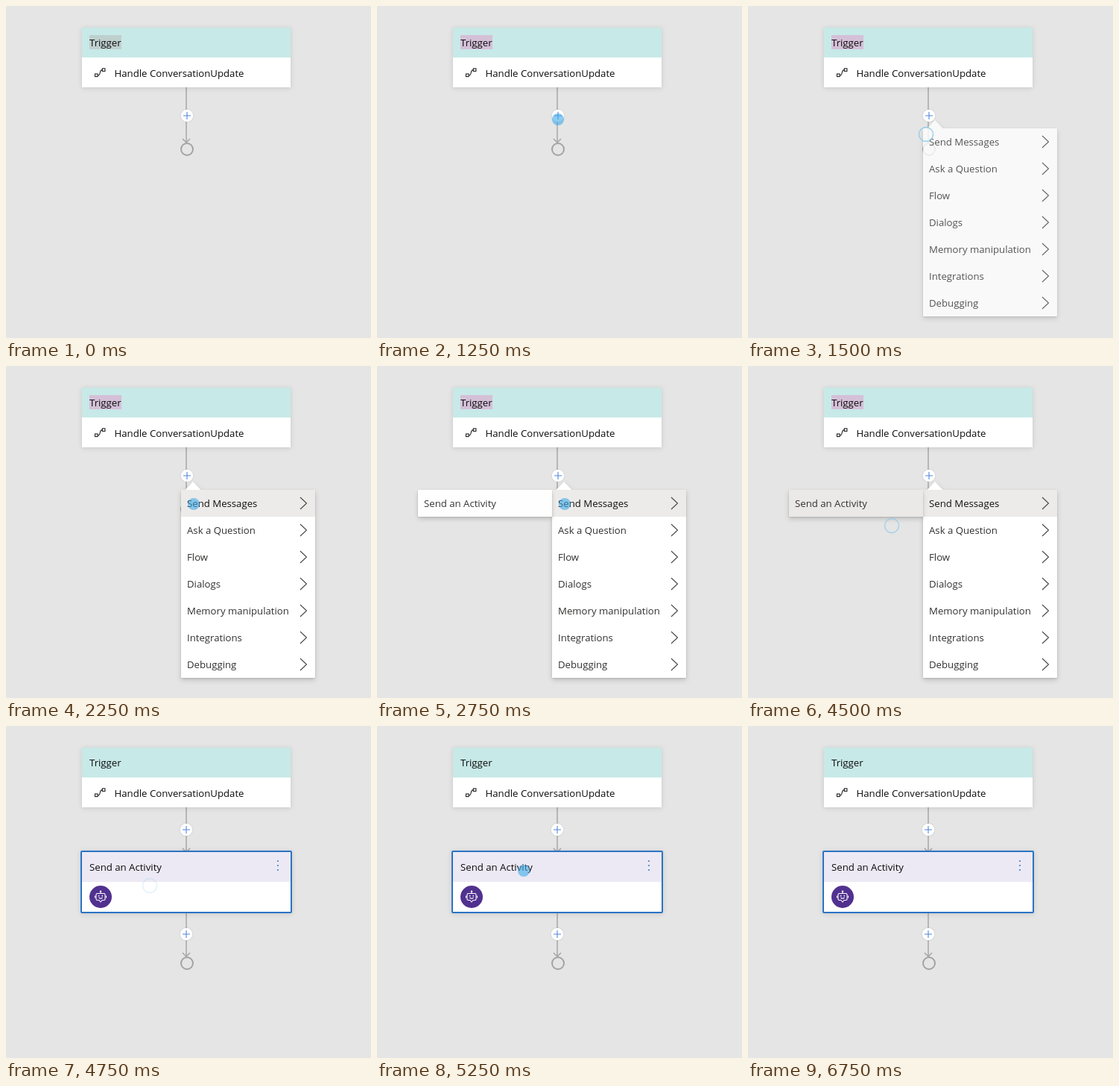
Write an HTML page that moves like this. It is 490x445 px and loops after 7500 ms.

```html
<!DOCTYPE html>
<html lang="en">
<head>
<meta charset="utf-8">
<title>Dialog flow editor</title>
<style>
  html, body { margin: 0; width: 100%; height: 100%; overflow: hidden; background: #e5e5e5; }
  svg { display: block; width: 490px; height: 445px; }
  text { font: 13.2px "Open Sans", "Noto Sans", sans-serif; fill: #0c0c0c; }
  .menu text { fill: #323130; }
  .menu { filter: drop-shadow(0 3px 3.5px rgba(0,0,0,.15)) drop-shadow(0 1px 1px rgba(0,0,0,.12)); }
  .card { filter: drop-shadow(0 1px 3px rgba(0,0,0,.13)); }
  .wire { fill: none; stroke: #a6a6a6; stroke-width: 1.5; }
  .end { fill: #e5e5e5; stroke: #a3a3a3; stroke-width: 2; }
  .thin { fill: none; stroke: #484644; stroke-width: 1.1; }
</style>
</head>
<body>
<svg id="stage" viewBox="0 0 490 445"></svg>
<script>
const LOOP = 7500;
const stage = document.getElementById('stage');

const box = (x, y, w, h, fill, extra = '') =>
  `<rect x="${x}" y="${y}" width="${w}" height="${h}" fill="${fill}" ${extra}/>`;
const label = (x, y, s, extra = '') => `<text x="${x}" y="${y}" ${extra}>${s}</text>`;
const path = (d, cls) => `<path d="${d}" class="${cls}"/>`;

const plus = (x, y) => `
  <circle cx="${x}" cy="${y}" r="8.2" fill="#fff" style="filter:drop-shadow(0 0 1px rgba(0,0,0,.15))"/>
  <path d="M${x - 5} ${y}h10M${x} ${y - 5}v10" stroke="#5086dc" stroke-width="1.1"/>`;
const arrow = (from, to) => path(`M242 ${from}V${to}M237 ${to - 5}l5 5l5-5`, 'wire');
const end = y => `<circle cx="243" cy="${y}" r="8" class="end"/>`;

const trigger = `
  <g class="card">
    ${box(102, 29, 280, 80, '#fff')}${box(102, 29, 280, 40, '#c7e9e7')}
  </g>
  <rect id="mark" x="112" y="39" width="43" height="19"/>
  ${label(112, 54, 'Trigger')}
  <g fill="none" stroke="#222" stroke-width="1.1">
    <rect x="119.5" y="91" width="3.6" height="3.6"/>
    <rect x="129.3" y="83.8" width="3.6" height="3.6"/>
    <path d="M123.2 93C128 93 124.500 85.600 129.300 85.600"/>
  </g>
  ${label(145.500, 95, 'Handle ConversationUpdate')}`;

const before = arrow(109, 183) + plus(243, 147) + end(192);

const bot = `
  <circle cx="127" cy="229" r="15" fill="#51318f"/>
  <g fill="none" stroke="#fff" stroke-width="1.1" stroke-linejoin="round">
    <path d="M122.500 224.500h9q1.500 0 1.500 1.500v6q0 1.500-1.500 1.500h-2.500l-2 2.500l-2-2.500h-2.500q-1.500 0-1.500-1.500v-6q0-1.500 1.500-1.500z"/>
    <path d="M127 224.500v-2M119.500 227.500v3M134.500 227.500v3M124.500 230q2.500 2.500 5 0"/>
  </g>
  <g fill="#fff"><circle cx="127" cy="221.700" r="1.200"/>
    <circle cx="124.700" cy="227.700" r=".9"/><circle cx="129.300" cy="227.700" r=".9"/></g>`;

const after = `
  ${arrow(109, 169)}${plus(242, 139)}
  ${arrow(250, 309)}${plus(242, 279)}${end(318)}
  <g class="card">
    ${box(101, 168, 282, 82, '#fff', 'stroke="#2b74c4" stroke-width="2" rx="1"')}
    ${box(102, 169, 280, 40, '#ece9f4')}
  </g>
  ${label(112, 194, 'Send an Activity')}
  ${[181, 187, 193].map(y => `<circle cx="365" cy="${y}" r="1.1" fill="#3c82cc"/>`).join('')}
  ${bot}`;

const items = ['Send Messages', 'Ask a Question', 'Flow', 'Dialogs',
  'Memory manipulation', 'Integrations', 'Debugging'];
const rows = items.map((s, i) => {
  const y = 184 + 36 * i;
  return label(243, y + 5, s, i ? '' : 'id="first"') + path(`M395 ${y - 8}l8.500 8l-8.500 8`, 'thin');
}).join('');

stage.innerHTML = `
  <g id="before">${before}</g>
  <g id="after">${after}</g>
  ${trigger}
  <g id="menu" class="menu">
    <path d="M240 166.500L251 155l11 11.500z" fill="#fff"/>
    ${box(235, 166, 180, 252, '#fff', 'rx="1"')}
    <rect id="hover" x="235" y="166" width="180" height="36" fill="#edebe9"/>
    ${rows}
  </g>
  <g id="sub" class="menu">
    <rect id="subfill" x="55" y="166" width="180" height="36"/>
    ${label(63, 189, 'Send an Activity')}
  </g>
  <circle id="dot" r="8" fill="#45ade8" fill-opacity=".62"/>
  <circle id="ring" r="9.5" fill="none" stroke="#8ccbea" stroke-width="1.500"/>`;

const el = {};
stage.querySelectorAll('[id]').forEach(n => el[n.id] = n);

// Each step changes only what it names; dot: [x, y], ring: [x, y, opacity], menu/sub: [opacity, shift]
const steps = [
  [0, { mark: '#bed0ce', done: false, hover: false, menu: null, sub: null, dot: null, ring: null, subFill: '#fff' }],
  [250, { dot: [247, 172] }],
  [500, { dot: [249, 203], mark: '#d5c0d8' }],
  [750, { dot: null, ring: [239.5, 182.5, .7] }],
  [1000, { ring: null }],
  [1250, { dot: [243, 152] }],
  [1500, { dot: null, ring: [239, 172, .85], menu: [.8, -2] }],
  [1750, { ring: [239, 172, .5], menu: [.97, 0] }],
  [2000, { ring: [239, 172, .2], menu: [1, 0] }],
  [2250, { ring: null, dot: [252, 185], hover: true }],
  [2500, { sub: [.8, 3] }],
  [2750, { sub: [.97, 0] }],
  [3000, { sub: [1, 0] }],
  [3250, { dot: [216, 192], subFill: '#edebe9' }],
  [3500, { dot: [197, 194] }],
  [4500, { dot: null, ring: [193, 214, .7], subFill: '#ebe9e7' }],
  [4750, { done: true, mark: 'none', menu: null, sub: null, ring: [193, 214, .25] }],
  [5000, { ring: null }],
  [5250, { dot: [197, 194] }],
  [6500, { dot: [290, 208] }],
  [6750, { dot: null }]
];

const show = (node, on) => node.setAttribute('visibility', on ? 'visible' : 'hidden');

function place(node, at) {
  show(node, at);
  if (!at) return;
  node.setAttribute('transform', `translate(${at[0]} ${at[1]})`);
  node.setAttribute('opacity', at[2] ?? 1);
}

function panel(node, look, axis) {
  node.style.display = look ? '' : 'none';
  if (!look) return;
  const [opacity, shift] = look;
  node.setAttribute('opacity', opacity);
  node.setAttribute('transform', axis === 'x' ? `translate(${shift} 0)` : `translate(0 ${shift})`);
}

function draw(t) {
  const s = Object.assign({}, ...steps.filter(step => step[0] <= t).map(step => step[1]));
  el.mark.setAttribute('fill', s.mark);
  show(el.before, !s.done);
  show(el.after, s.done);
  panel(el.menu, s.menu, 'y');
  panel(el.sub, s.sub, 'x');
  show(el.hover, s.hover);
  el.first.style.fill = s.hover ? '#111' : '';
  el.subfill.setAttribute('fill', s.subFill);
  place(el.dot, s.dot);
  place(el.ring, s.ring);
}

const start = performance.now();
function tick() {
  draw((performance.now() - start) % LOOP);
  requestAnimationFrame(tick);
}
tick();
</script>
</body>
</html>
```
